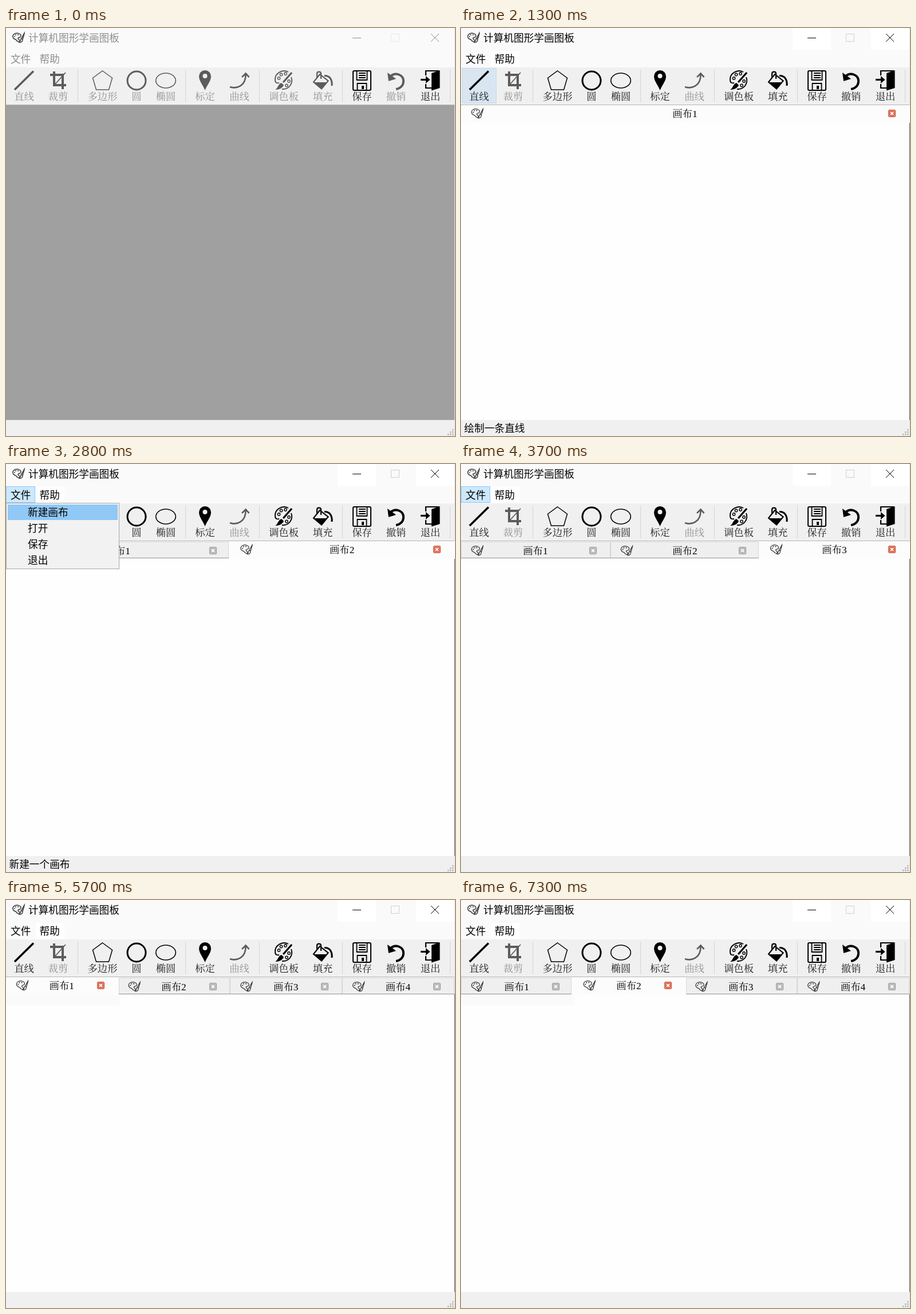
An HTML page for the animation above (7.8 s loop, 784 by 714 pixels).

```html
<!DOCTYPE html>
<html lang="zh-CN">
<head>
<meta charset="utf-8">
<title>画图板</title>
<style>
html, body { margin: 0; width: 100%; height: 100%; overflow: hidden; background: #f0f0f0; }
svg { display: block; width: 784px; height: 714px; }
text { font: 17.67px "Noto Sans CJK SC", "Noto Sans CJK", "Noto Sans", sans-serif; fill: currentColor; }
.song { font: 300 17.33px "Liberation Serif", "Noto Serif CJK SC", "Noto Sans CJK SC", "Noto Sans CJK", serif; text-anchor: middle; }
.line { fill: none; stroke: currentColor; }
.solid { fill: currentColor; }
.tool { color: #000; }
.tool text { fill: #1c1c1c; }
.tool.off { color: #5c5c5c; }
.tool.off text { fill: #929292; }
.hot { fill: #d9e6f1; stroke: #bfdaf0; }
.sel { fill: #cce8ff; stroke: #90c8f6; }
</style>
</head>
<body>
<svg viewBox="0 0 784 714">
  <defs>
    <g id="app">
      <path class="line" d="M-10-1C-11-7-4-9 1-7C4-6 5-3 3-1C1 0-1-1-1 1C-1 3 3 4 2 6C0 8-3 6-4 4C-6 2-9 3-10-1Z"/>
      <g class="solid"><circle cx="-7" cy="-2" r="1.1"/><circle cx="-5" cy="-5" r="1.1"/><circle cx="-1" cy="-5" r="1.1"/></g>
      <path class="line" d="M10-8L5 1L7 3L10-7Z M5 1C3 3 4 6 1 8C5 9 7 6 7 3"/>
    </g>
  </defs>

  <rect width="784" height="714" fill="#f0f0f0"/>
  <rect width="784" height="69" fill="#fafafa"/>
  <g id="patch" fill="#fff">
    <rect x="579" width="67" height="38"/><rect x="716" width="67" height="38"/><rect x="52" y="40" width="50" height="28"/>
  </g>
  <rect id="red" x="716" width="67" height="38" fill="#e81123"/>
  <rect id="file" class="sel" x=".5" y="39.5" width="50" height="28"/>
  <g id="caption">
    <use href="#app" x="22" y="17" stroke-width="1.7" color="#4a4a4a"/>
    <text x="39" y="23.5">计算机图形学画图板</text>
    <text x="8" y="60.5">文件</text>
    <text x="58.5" y="60.5">帮助</text>
    <path class="line" d="M605 17.5H620"/>
    <path id="cross" class="line" d="M742 10L756 24M756 10L742 24"/>
  </g>
  <rect id="max" x="672.5" y="10.5" width="14" height="13" fill="none"/>

  <path d="M125.5 73V130M313.5 73V130M442.5 73V130M587.5 73V130M775.5 73V130" stroke="#d4d4d4"/>
  <g id="tools"></g>

  <rect y="134" width="783" height="552" fill="#a0a0a0"/>
  <path d="M0 134.5H783" stroke="#b4b4b4"/>
  <path d="M783.5 0V714" stroke="#e2e2e2"/>
  <g id="canvas">
    <rect y="135" width="783" height="551" fill="#fefefe"/>
    <rect id="trace" y="165" width="198" height="19" fill="#fafafa"/>
    <path d="M783.5 165V686" stroke="#5a5a5a"/>
    <g id="tabs"></g>
  </g>
  <text id="status" x="5.5" y="707"></text>
  <g id="grip" fill="#b4b4b4"></g>
  <g id="menu"></g>
</svg>
<script>
const $ = id => document.getElementById(id);
const LOOP = 7800;

// label, centre, hover left, hover width, icon
const tools = [
  ['直线', 31.5, 2, 59, '<path class="line" stroke-width="3.6" d="M15 108L48 75.5"/>'],
  ['裁剪', 91, 62, 58, '<path class="line" stroke-width="4" d="M77 82H99V107M84 76V100H105"/><path class="line" stroke-width="1.8" d="M85 99L104 78"/>'],
  ['多边形', 168.5, 138, 62, '<path class="line" stroke-width="1.5" d="M168.5 75L185.5 87.5L179.5 108H157.5L151.5 87.5Z"/>'],
  ['圆', 228, 202, 51, '<circle class="line" stroke-width="3" cx="228" cy="92" r="16"/>'],
  ['椭圆', 279, 254, 51, '<ellipse class="line" stroke-width="1.6" cx="279" cy="92" rx="17.3" ry="13"/>'],
  ['标定', 347.5, 318, 59, '<path class="solid" fill-rule="evenodd" d="M347.5 109C344 100 337 93 337 84.5A10.5 10.5 0 0 1 358 84.5C358 93 351 100 347.5 109ZM347.5 80A4 4 0 1 0 347.5 88A4 4 0 1 0 347.5 80Z"/>'],
  ['曲线', 407.5, 378, 59, '<path class="line" stroke-width="2.6" d="M391 103C402 107 419 102 418.5 81M412 86L418.5 79.5L424.5 86"/>'],
  ['调色板', 485, 455, 60, `<path class="line" stroke-width="1.9" d="M493 77C482 71 469 80 470 91C470 96 473 97 477 96M498 86C502 97 494 108 482 107"/>
    <g class="line" stroke-width="1.4"><circle cx="476.5" cy="88" r="2.2"/><circle cx="480.5" cy="81.5" r="2.2"/><circle cx="488" cy="80" r="2.2"/><circle cx="494" cy="93" r="2.2"/><circle cx="490" cy="100.5" r="2.2"/></g>
    <path class="line" stroke-width="3.2" d="M499 78L484 95"/><path class="solid" d="M481 96L485 100C483 105 477 108 470 108C475 105 475 98 481 96Z"/>`],
  ['填充', 553, 524, 59, `<path class="line" stroke-width="2.2" d="M548 81L537 94.5L551 106.5L562.5 92.5ZM543 87V80C543 75.5 550 75.5 550 80V89"/>
    <path class="solid" d="M538 95H561L551 106Z"/><path class="line" stroke-width="3" d="M556 83.5C564 83 570 89 569 101"/>`],
  ['保存', 621.5, 592, 59, `<rect class="line" stroke-width="2" x="606" y="75" width="31" height="34" rx="2"/>
    <path class="line" stroke-width="1.8" d="M612.5 75V91H630.5V75M613.5 109V97H629.5V109M616 79H628M616 83H628M616 87H628"/><rect class="solid" x="621" y="101" width="4" height="6"/>`],
  ['撤销', 681, 651, 60, '<path class="line" stroke-width="4" d="M671 85C680 76 694 82 694 93C694 101 688 106 681 107"/><path class="solid" d="M666 78L668 93L681 89Z"/>'],
  ['退出', 741, 712, 59, `<path class="solid" d="M743 79L757.5 74V105L743 109.5Z"/><path class="line" stroke-width="2.2" d="M733 83V75H756M733 98V105H744"/>
    <path class="line" stroke-width="3.2" d="M724 90.5H736"/><path class="solid" d="M733 84L740.5 90.5L733 97Z"/>`]
];
const EXIT = 11, UNDO = 10;
const alwaysOn = ['保存', '退出'], alwaysOff = ['裁剪', '曲线'];

$('tools').innerHTML = tools.map(([label, cx, x, w, icon]) =>
  `<g class="tool"><rect class="hot" x="${x + .5}" y="70.5" width="${w}" height="61"/>${icon}<text class="song" x="${cx}" y="126">${label}</text></g>`).join('');

for (let row = 0; row < 3; row++)
  for (let col = 2 - row; col < 3; col++)
    $('grip').innerHTML += `<rect x="${771 + col * 4}" y="${702 + row * 4}" width="2.5" height="2.5"/>`;

$('menu').innerHTML = '<rect x=".5" y="68.5" width="197" height="115" fill="#f2f2f2" stroke="#a6a6a6"/>' +
  '<rect id="pick" x="3" y="71" width="192" height="27" fill="#90c8f6"/>' +
  ['新建画布', '打开', '保存', '退出'].map((s, i) => `<text x="38" y="${91 + i * 28}">${s}</text>`).join('');

function tab(i, n, sel, hover) {
  const w = 783 / n, start = i * w, on = i + 1 === sel;
  const left = Math.floor(start) + (i === sel ? 2 : 0);
  const right = Math.floor(start + w) - (i + 2 === sel ? 2 : 0);
  const y = on ? 149.5 : 151.5, bx = Math.floor(start + w - 30.5);
  const back = on
    ? `<rect x="${Math.max(0, left - 2)}" y="135" width="${right - left + 3}" height="31" fill="#fcfcfc"/>`
    : `<rect x="${left + .5}" y="136.5" width="${right - left - 1}" height="28" fill="${hover === i + 1 ? '#d9eaf8' : '#efefef'}" stroke="#d6d6d6"/>
       <path d="M${left} 164.5H${right}" stroke="#929292"/>`;
  return back + `<use href="#app" x="${start + 28.5}" y="${y}" stroke-width="1.2" color="#333"/>
    <text class="song" x="${start + w / 2 - .6}" y="${y + 6}" fill="#222">画布${i + 1}</text>
    <rect x="${bx - 5.5}" y="${y - 6}" width="12" height="12" rx="1.5" fill="${on ? '#dd5f42' : '#b0b0b0'}" stroke="${on ? '#c84a30' : '#969696'}"/>
    <rect x="${bx - 4.5}" y="${y - 5}" width="10" height="10" fill="none" stroke="#fff" stroke-opacity=".35"/>
    <path d="M${bx - 2} ${y - 2.5}l5 5m0-5l-5 5" stroke="#fff" stroke-width="2"/>`;
}

const start = { active: 0, file: 0, menu: 0, pick: 0, patch: 0, n: 0, sel: 0, hover: 0, tool: -1, red: 0, status: '', trace: 0 };
const made = n => ({ n, sel: n, tool: 0, file: 0, menu: 0, pick: 0, status: '绘制一条直线' });
const clear = { tool: -1, status: '' };
const open = { file: 1, menu: 1, pick: 1, status: '新建一个画布' };

// time and what changes then
const steps = [
  [0, start], [100, { active: .35 }], [200, { active: .7 }], [300, { active: 1 }], [400, { file: 1 }],
  [700, { menu: .35, patch: 1 }], [800, { menu: .75 }], [900, open],
  [1300, made(1)], [1600, { ...clear, file: 1 }], [1800, { menu: .35 }], [1900, { menu: .75 }], [2000, open],
  [2200, made(2)], [2300, clear], [2600, { file: 1 }], [2700, { menu: .6 }], [2800, open],
  [3200, made(3)], [3300, clear], [3700, { file: 1 }], [3800, { menu: .6 }], [3900, open],
  [4200, { ...made(4), trace: 1 }], [4300, clear], [4400, { hover: 2 }],
  [4700, { sel: 2, hover: 0 }], [4900, { hover: 3 }],
  [5200, { sel: 3, hover: 0 }], [5300, { hover: 2 }], [5400, { hover: 1 }],
  [5700, { sel: 1, hover: 0 }], [5900, { hover: 2 }], [6200, { sel: 2, hover: 0 }],
  [6400, { hover: 3 }], [6500, { hover: 0, tool: UNDO }],
  [6700, { tool: EXIT, status: '退出程序' }], [6800, clear],
  [7000, { red: 1 }], [7100, { red: .66 }], [7200, { red: .33 }], [7300, { red: 0 }]
];
let last = {};
const states = steps.map(([t, change]) => [t, last = { ...last, ...change }]);

const show = (id, v) => $(id).setAttribute('opacity', +v);
const gray = v => `rgb(${v},${v},${v})`;

function draw(s) {
  for (const id of ['file', 'menu', 'pick', 'patch', 'red', 'trace']) show(id, s[id]);
  show('canvas', s.n > 0);
  $('caption').style.color = gray(Math.round(142 * (1 - s.active)));
  $('cross').style.stroke = s.red > .5 ? '#fff' : '';
  $('max').setAttribute('stroke', gray(Math.round(234 - 26 * s.active)));
  $('status').textContent = s.status;
  [...$('tools').children].forEach((g, i) => {
    const label = tools[i][0];
    g.classList.toggle('off', alwaysOff.includes(label) || !s.n && !alwaysOn.includes(label));
    g.firstChild.setAttribute('opacity', +(i === s.tool));
  });
  let html = '';
  for (let i = 0; i < s.n; i++) html += tab(i, s.n, s.sel, s.hover);
  $('tabs').innerHTML = html;
}

let shown;
const began = performance.now();
function tick() {
  const t = (performance.now() - began) % LOOP;
  const now = states.findLast(([at]) => at <= t)[1];
  if (now !== shown) draw(shown = now);
  requestAnimationFrame(tick);
}
tick();
</script>
</body>
</html>
```
